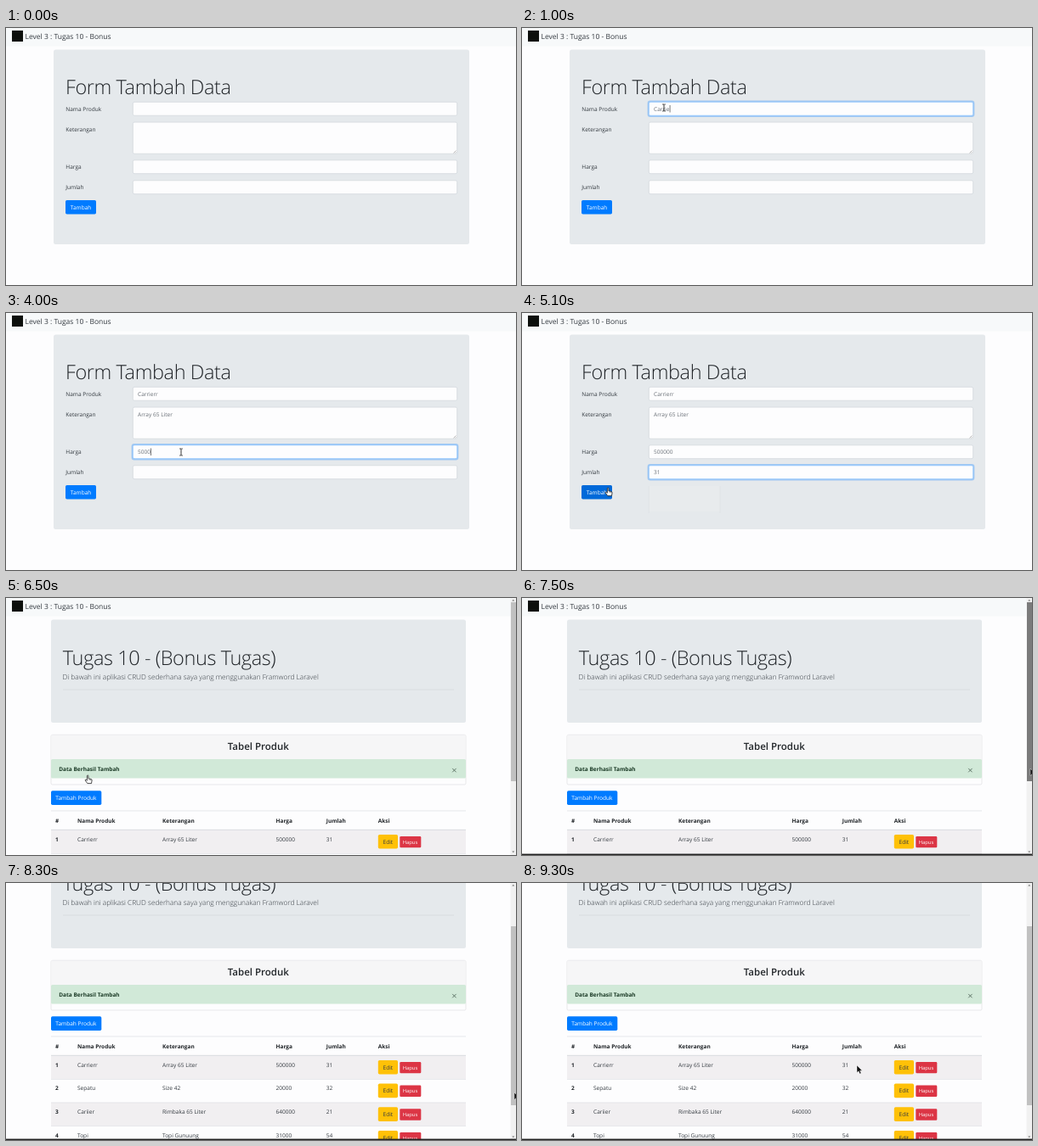
Write an HTML page that moves like this. It is 600 px wide and 303 px high and loops after 9400 ms.

```html
<!DOCTYPE html>
<html lang="id">
<head>
<meta charset="utf-8">
<title>Form Tambah Data</title>
<style>
  html, body { margin: 0; width: 100%; height: 100%; overflow: hidden; background: #fdfdfe; }
  svg { display: block; width: 600px; height: 303px; }
  text {
    font: 6.55px "Open Sans", "Noto Sans", sans-serif;
    fill: #343a40; white-space: pre; text-rendering: geometricPrecision;
  }
  .brand { font-size: 8.5px; }
  .display { font-size: 23.5px; font-weight: 300; letter-spacing: -.4px; fill: #212529; }
  .lead { font-size: 8.27px; font-weight: 300; }
  .title { font-size: 11.5px; font-weight: 600; fill: #212529; text-anchor: middle; }
  .bold { font-weight: 700; font-size: 6.5px; fill: #212529; }
  .white { fill: #fff; }
  .small { font-size: 5.8px; }
  .value { fill: #6a7077; }
  .panel { fill: #e5e9ec; }
  .rule { fill: #dadde1; }
  .input { fill: #fdfdfe; stroke: #ced4da; stroke-width: .7; }
  .ring { fill: none; stroke: #007bff; stroke-opacity: .3; stroke-width: 2; display: none; }
  .focus .ring { display: inline; }
  .focus .input { stroke: #80bdff; }
  .caret { fill: #222; }
</style>
</head>
<body>
<svg id="stage" viewBox="0 0 600 303">
  <defs>
    <g id="navbar">
      <rect width="600" height="21.5" fill="#f7f9fa"/>
      <rect x="7" y="3" width="13" height="13" fill="#0c0f0c"/>
      <text class="brand" x="22.5" y="13.2">Level 3 : Tugas 10 - Bonus</text>
    </g>
  </defs>
  <rect width="600" height="303" fill="#fdfdfe"/>

  <g id="formPage">
    <use href="#navbar"/>
    <rect class="panel" x="56" y="25.5" width="489" height="229.5" rx="2.5"/>
    <text class="display" x="70" y="78.4">Form Tambah Data</text>
    <g id="fields"></g>
    <path d="M526.5 147.5l3-3M528.3 147.5l1.2-1.2" stroke="#777" stroke-width=".5"/>
    <g id="ghost">
      <rect x="149" y="204" width="84" height="30" fill="#e8ebed"/>
      <path d="M149.3 204V236M233 204V236" stroke="#dde1e4" stroke-width=".7"/>
    </g>
    <g id="submit">
      <rect class="ring" x="69.5" y="202.5" width="37" height="17.5" rx="2.2"/>
      <rect id="submitFill" x="70" y="203" width="36" height="16.5" rx="1.7"/>
      <text class="white" x="75.8" y="213.8">Tambah</text>
    </g>
  </g>

  <g id="listPage">
    <g id="scroller">
      <use href="#navbar"/>
      <rect class="panel" x="53" y="25.5" width="488" height="121.5" rx="2.5"/>
      <text class="display" x="66.8" y="78.9">Tugas 10 - (Bonus Tugas)</text>
      <text class="lead" x="66.5" y="95.6">Di bawah ini aplikasi CRUD sederhana saya yang menggunakan Framword Laravel</text>
      <rect x="67" y="107.6" width="460" height=".8" fill="#d5d9dc"/>
      <rect x="53" y="161.3" width="488" height="58.7" rx="1.7" fill="#fdfdfe" stroke="#dfdfe1" stroke-width=".7"/>
      <rect x="53.4" y="161.7" width="487.2" height="28.3" fill="#f6f6f7"/>
      <text class="title" x="296.8" y="179">Tabel Produk</text>
      <rect x="53" y="190" width="488" height="22.5" rx="1.5" fill="#d1e9d8"/>
      <text class="bold" x="62.3" y="204.2" style="fill:#1b3a26">Data Berhasil Tambah</text>
      <path d="M525.2 200.9l4.4 4.4m0-4.4l-4.4 4.4" stroke="#5f7567" stroke-width="1"/>
      <rect x="53" y="227.3" width="59.3" height="16.7" rx="1.7" fill="#007bff"/>
      <text class="white" x="58.3" y="238.2">Tambah Produk</text>
      <g id="table"></g>
    </g>
    <rect x="593.5" width="6.5" height="303" fill="#f1f1f1"/>
    <path d="M595.3 3.4l1.5-1.7 1.5 1.7M595.3 298.6l1.5 1.7 1.5-1.7" fill="#777"/>
    <rect id="thumb" x="594" width="6" height="211"/>
    <rect id="edge" y="301.6" width="600" height="1.4" fill="#222"/>
  </g>

  <g id="beam" fill="none" stroke="#222" stroke-width=".9">
    <path d="M-1.8-4H-.4L0-3.6.4-4H1.8M0-3.6V3.6M-1.8 4H-.4L0 3.6.4 4H1.8"/>
  </g>
  <g id="hand">
    <path d="M-1.6-4.6q.8-.9 1.5 0V-1.2l3 .6q1.3.3 1.2 1.6L3.5 4.6H-1.2L-3.8 1q-.2-1.2 1-.9l1.2 1.1Z"
      fill="#fff" stroke="#222" stroke-width=".8" stroke-linejoin="round"/>
    <path d="M1 1V-.6M2.6 1.2V-.3" stroke="#222" stroke-width=".5"/>
  </g>
  <path id="arrow" d="M0 0V8.6L2 6.8 3.4 10 5 9.3 3.6 6.2H6.2Z" fill="#111" stroke="#fff" stroke-width=".4"/>
</svg>
<script>
  const LOOP = 9400;
  const $ = id => document.getElementById(id);
  const show = (el, on) => { el.style.display = on ? "inline" : "none"; };
  const ease = p => p * p * (3 - 2 * p);
  const clamp = v => Math.max(0, Math.min(1, v));
  const keys = (t, start) => Math.floor((t - start) / 100);
  const drag = t => ease(clamp((t - 7500) / 800));

  // focus: [from, to]; typed: number of characters entered at time t
  const fields = [
    { label: "Nama Produk", y: 87, h: 16.5, text: "Carrierr", focus: [400, 1600],
      typed: t => keys(t, 400) },
    { label: "Keterangan", y: 110.8, h: 37.7, text: "Array 65 Liter", focus: [1600, 3500],
      typed: t => keys(t, 1700) - (t >= 2300) - (t >= 3200) },
    { label: "Harga", y: 155.5, h: 16.5, text: "500000", focus: [3500, 4400],
      typed: t => keys(t, 3600) },
    { label: "Jumlah", y: 179.5, h: 16.5, text: "31", focus: [4400, 5300],
      typed: t => keys(t, 4600) }
  ];

  $("fields").innerHTML = fields.map(({ label, y, h }) => `
    <text x="70.3" y="${y + 10.8}">${label}</text>
    <g class="field">
      <rect class="ring" x="148.6" y="${y - .4}" width="382.8" height="${h + .8}" rx="2.2"/>
      <rect class="input" x="149.3" y="${y + .3}" width="381.4" height="${h - .6}" rx="1.7"/>
      <text class="value" x="155" y="${y + 10.8}"></text>
      <rect class="caret" y="${y + 4}" width=".6" height="8.5"/>
    </g>`).join("");
  document.querySelectorAll(".field").forEach((box, i) => {
    Object.assign(fields[i], { box, value: box.querySelector(".value"), caret: box.querySelector(".caret") });
  });

  const columns = [58, 84, 184, 317.5, 376.8, 437.8];
  const heads = ["#", "Nama Produk", "Keterangan", "Harga", "Jumlah", "Aksi"];
  const products = [
    ["Carrierr", "Array 65 Liter", "500000", "31"],
    ["Sepatu", "Size 42", "20000", "32"],
    ["Cariier", "Rimbaka 65 Liter", "640000", "21"],
    ["Topi", "Topi Gunuung", "31000", "54"]
  ];
  const cell = (text, i, y, cls = "") => `<text class="${cls}" x="${columns[i]}" y="${y}">${text}</text>`;
  const row = (item, i) => {
    const y = 273.3 + i * 27.7;
    return `<rect x="53" y="${y}" width="488" height="27.7" fill="${i % 2 ? "#fdfdfe" : "#f1eff1"}"/>
      <rect class="rule" x="53" y="${y}" width="488" height=".6"/>
      ${cell(i + 1, 0, y + 13.3, "bold")}
      ${item.map((text, c) => cell(text, c + 1, y + 13.3)).join("")}
      <rect x="437.8" y="${y + 5.6}" width="23.2" height="16.6" rx="1.7" fill="#ffc107"/>
      <text x="443.5" y="${y + 16.4}">Edit</text>
      <rect x="463.3" y="${y + 7.6}" width="25" height="13.4" rx="1.3" fill="#dc3545"/>
      <text class="white small" x="466.8" y="${y + 16.4}">Hapus</text>`;
  };
  $("table").innerHTML = `<rect class="rule" x="53" y="250.6" width="488" height=".7"/>`
    + heads.map((text, i) => cell(text, i, 264.6, "bold")).join("")
    + products.map(row).join("")
    + `<rect class="rule" x="53" y="272.8" width="488" height=".9"/>`;

  // [time, x, y, cursor shape until the next stop]
  const stops = [
    [100, 130, 14, "arrow"], [300, 160, 86, "beam"], [450, 167, 94, "beam"],
    [1250, 167, 94, "beam"], [1600, 200, 130, "beam"], [2400, 200, 130, "beam"],
    [2900, 212, 145.5, "beam"], [3200, 212, 145.5, "beam"], [3500, 206, 164, "beam"],
    [4200, 206, 164, "beam"], [4400, 200, 188, "beam"], [4750, 200, 188, "arrow"],
    [5000, 102, 211, "hand"], [5700, 102, 211, "hand"], [6100, 97, 214, "hand"],
    [6550, 97, 214, "arrow"], [7400, 598, 201, "arrow"], [7500, 598, 201, "arrow"],
    [8300, 598, 247, "arrow"], [8450, 536, 240, "arrow"], [9300, 394, 215, "arrow"]
  ];

  function drawCursor(t) {
    const n = stops.findLastIndex(s => t >= s[0]);
    const a = stops[n], b = stops[n + 1] || a;
    for (const shape of ["beam", "hand", "arrow"]) show($(shape), a && shape === a[3]);
    if (!a) return;
    const p = ease(clamp((t - a[0]) / (b[0] - a[0] || 1)));
    const x = a[1] + (b[1] - a[1]) * p, y = a[2] + (b[2] - a[2]) * p;
    $(a[3]).setAttribute("transform", `translate(${x} ${y})`);
  }

  function drawForm(t) {
    for (const f of fields) {
      const focused = t >= f.focus[0] && t < f.focus[1];
      f.value.textContent = f.text.slice(0, Math.max(0, f.typed(t)));
      f.box.classList.toggle("focus", focused);
      show(f.caret, focused && t < 5000);
      if (focused) f.caret.setAttribute("x", 155.3 + f.value.getComputedTextLength());
    }
    show($("ghost"), t >= 4700 && t < 5300);
    $("submit").classList.toggle("focus", t >= 5300);
    $("submitFill").setAttribute("fill", t >= 4950 ? "#0069d9" : "#007bff");
  }

  function drawList(t) {
    const p = drag(t);
    $("scroller").setAttribute("transform", `translate(0 ${-70 * p})`);
    $("thumb").setAttribute("y", 5 + 46 * p);
    $("thumb").setAttribute("fill", t >= 7500 && t < 8300 ? "#7b7b7b" : "#c1c1c1");
    show($("edge"), t >= 7500);
  }

  const begin = performance.now();

  function draw() {
    const t = (performance.now() - begin) % LOOP;
    const listed = t >= 6500;
    show($("formPage"), !listed);
    show($("listPage"), listed);
    if (listed) drawList(t); else drawForm(t);
    drawCursor(t);
    requestAnimationFrame(draw);
  }
  draw();
</script>
</body>
</html>
```
